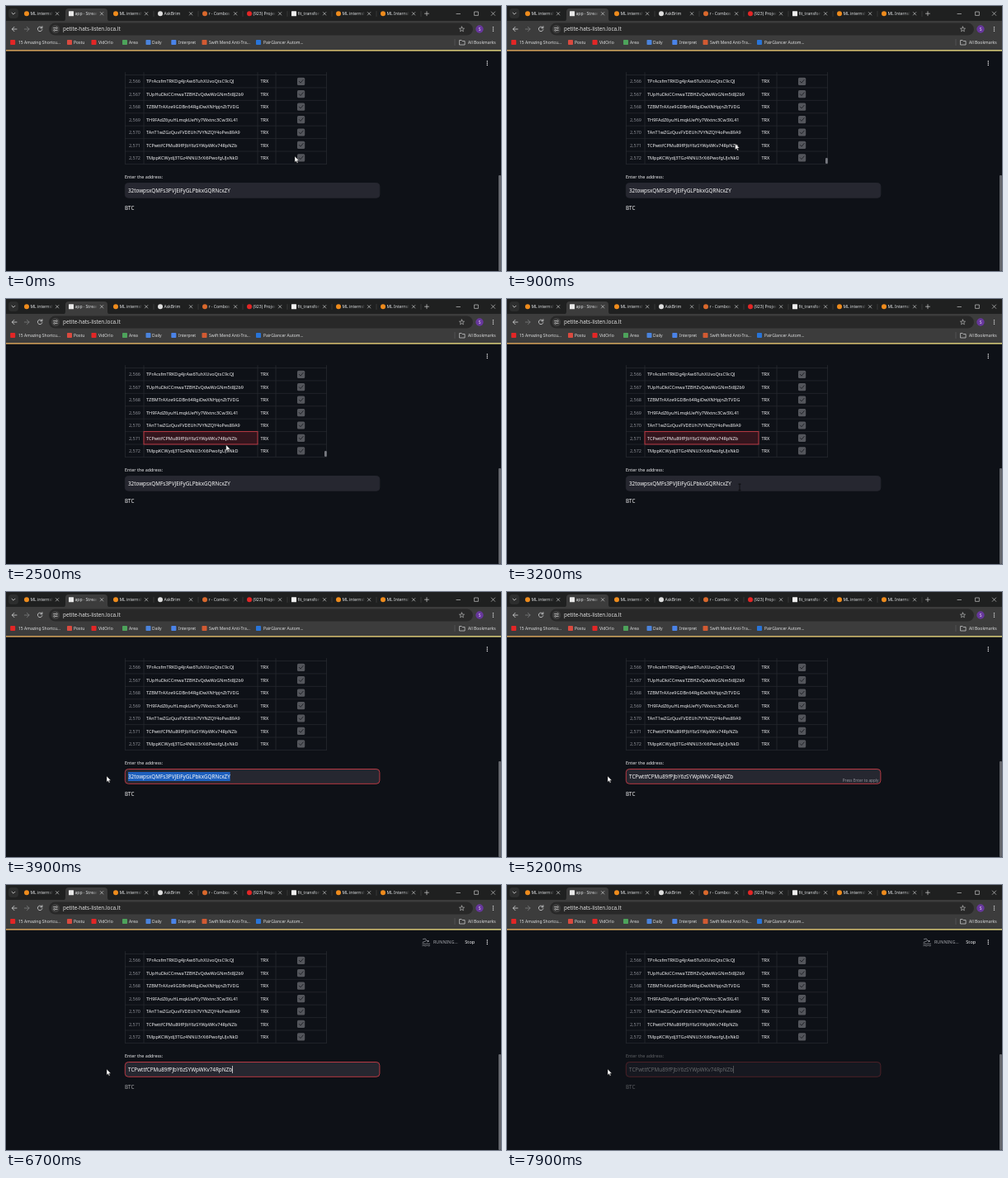
Animation, 600 px wide and 321 px high, one loop 8000 ms. Source, as an HTML page:

```html
<!DOCTYPE html>
<html lang="en">
<head>
<meta charset="utf-8">
<title>Address lookup</title>
<style>
html, body { margin: 0; width: 100%; height: 100%; overflow: hidden; background: #0e1117; }
svg { display: block; width: 600px; height: 321px; }
text { font-family: "Noto Sans", "Open Sans", sans-serif; white-space: pre; }
</style>
</head>
<body>
<svg id="stage" viewBox="0 0 600 321"></svg>
<script>
const LOOP = 8000, STEP = 100;
const NS = 'http://www.w3.org/2000/svg';
const stage = document.getElementById('stage');

function add(tag, attrs, parent = stage) {
  const el = document.createElementNS(NS, tag);
  for (const k in attrs) el.setAttribute(k, attrs[k]);
  parent.appendChild(el);
  return el;
}
const rect = (x, y, width, height, fill, more = {}, parent) =>
  add('rect', { x, y, width, height, fill, ...more }, parent);
const dot = (cx, cy, r, fill, parent) => add('circle', { cx, cy, r, fill }, parent);
const line = (d, stroke, width = 0.8, parent) =>
  add('path', { d, stroke, 'stroke-width': width, fill: 'none', 'stroke-linecap': 'round', 'stroke-linejoin': 'round' }, parent);
function label(x, y, str, size, fill, more = {}, parent) {
  const el = add('text', { x, y, 'font-size': size, fill, ...more }, parent);
  el.textContent = str;
  return el;
}
function gradient(id, stops, more = {}) {
  const el = add('linearGradient', { id, ...more }, add('defs', {}));
  for (const [offset, tone] of stops) add('stop', { offset, 'stop-color': tone }, el);
}
const group = () => add('g', {});
function kebab(x, y, fill) {
  for (const d of [-2.2, 0, 2.2]) dot(x, y + d, 0.75, fill);
}

function drawTabs() {
  rect(0, 0, 600, 19, '#1f2020');
  rect(3, 3, 12, 12, '#2d2e2e', { rx: 4 });
  line('M7 8.2L9 10.2L11 8.2', '#d8d8d8');
  add('path', { d: 'M68 19Q72 19 72 15V7Q72 3 76 3H119Q123 3 123 7V15Q123 19 127 19Z', fill: '#3c3c3c' });

  const orange = '#ee8b1c';
  const tabs = [
    ['ML internship', orange], ['app · Streamlit', '#e8e8e8'], ['ML internship', orange],
    ['AskBrim', '#dedede'], ['r - Combos', '#d9682c'], ['(923) Project', '#e32626'],
    ['fit_transform', '#f0f0f0'], ['ML internship', orange], ['ML Internship', orange]
  ];
  tabs.forEach(([name, tone], i) => {
    const x = 25 + i * 54;
    gradient('fade' + i, [[0.8, '#fff'], [1, '#000']], { gradientUnits: 'userSpaceOnUse', x1: x, x2: x + 32, y1: 0, y2: 0 });
    const mask = add('mask', { id: 'tab' + i, maskUnits: 'userSpaceOnUse', x, y: 0, width: 32, height: 19 });
    rect(x, 0, 32, 19, `url(#fade${i})`, {}, mask);
    if (i === 1 || i === 6) rect(x - 3, 6.2, 6, 6, tone, { rx: 0.5 });
    else dot(x, 9.2, 3, tone);
    label(x + 4.4, 11.2, name, 5.1, '#dfe1e3', { mask: `url(#tab${i})` });
    line(`M${x + 35.4} 7.6l3.4 3.4m0 -3.4l-3.4 3.4`, '#c9cacb', 0.7);
    if (i > 1) line(`M${x + 46} 6.5v6`, '#4a4b4b', 0.6);
  });
  line('M507.5 9.2h5M510 6.7v5', '#d0d0d0', 0.7);
  line('M546 9.5h4.5', '#e0e0e0', 0.6);
  line('M568 7h4.4v4.4h-4.4z', '#e0e0e0', 0.6);
  line('M588.3 7l4.4 4.4m0 -4.4l-4.4 4.4', '#e0e0e0', 0.6);
}

function drawToolbar() {
  rect(0, 18, 600, 36, '#3c3c3c');
  rect(52, 20.5, 514, 15, '#282828', { rx: 7.5 });
  line('M13 28H7.4M10 25.3L7.3 28L10 30.7', '#d5d6d7');
  line('M22.4 28H28M25.4 25.3L28.1 28L25.4 30.7', '#7d7e7f');
  line('M43.6 26.4A2.8 2.8 0 1 0 43.9 28.7M43.9 24.6V26.8H41.7', '#d5d6d7');
  dot(60, 28, 5.2, '#3c3c3c');
  line('M57.6 26.6h2M62.2 29.4h-2', '#e3e3e3', 0.7);
  for (const d of [-1.4, 1.4])
    add('circle', { cx: 60 - d, cy: 28 + d, r: 0.9, fill: 'none', stroke: '#e3e3e3', 'stroke-width': 0.6 });
  label(69, 30.2, 'petite-hats-listen.loca.lt', 6.35, '#e3e3e3');
  let star = '';
  for (let i = 0; i < 10; i++) {
    const a = i * Math.PI / 5, r = i % 2 ? 1.4 : 3.2;
    star += `${i ? 'L' : 'M'}${552.5 + r * Math.sin(a)} ${28.2 - r * Math.cos(a)}`;
  }
  line(star + 'Z', '#c8c9ca', 0.6);
  dot(574, 28, 4.7, '#67379c');
  label(574, 29.9, 'S', 5, '#f0e8fa', { 'text-anchor': 'middle' });
  kebab(590.5, 28, '#d5d6d7');

  const marks = [
    [8.2, '15 Amazing Shortcu...', '#e32626', 15], [77, 'Postu', '#d94a3f', 82],
    [106.5, 'VidOrlo', '#e32626', 112], [144, 'Area', '#4da35b', 149],
    [172.5, 'Daily', '#4a83dc', 177], [203.3, 'Interpret', '#4a83e8', 209],
    [240.5, 'Swift Mend Anti-Tra...', '#d25a32', 246], [306, 'PairGlancer Autom...', '#2874d8', 312]
  ];
  for (const [cx, name, tone, x] of marks) {
    rect(cx - 3, 41, 6, 6, tone, { rx: 0.8 });
    label(x, 45.9, name, 5, '#dfe0e1');
  }
  line('M544 40.5v7', '#606162', 0.6);
  line('M550 41.5h2.2l.9 1h3v4.5h-6.1z', '#d5d6d7', 0.7);
  label(560, 45.9, 'All Bookmarks', 5, '#dfe0e1');
}

const rows = [
  'TPrAcsfmTRKDg4jrAw6TuhXUvoQtsC9cQJ', 'TUpHuDkiCCmwaTZBHZvQdwWzGNm5t8J2b9',
  'TZBMTrAXze9GDBn64RgiDwXNHpjnZtTVDG', 'TH9FAdZ6yuHLmqkUefYy7Wxtnc3Cw3XL41',
  'TAnT1wZGzQuvFVDEUh7VYNZQY4oPes89A9', 'TCPwttfCPMu89fPJbY6zSYWpWKv74RpNZb',
  'TMppKCWydj3TGz4NNU3rXi6PwofgUJxNkD'
];
const OLD = '32towpsxQMFs3PVJEiFyGLPbkxGQRNcxZY', NEW = rows[5];
const rowY = i => 83.5 + i * 15.42;

function drawTable() {
  for (let i = 0; i <= rows.length; i++) line(`M144.5 ${rowY(i)}H388.5`, '#292b32', 0.7);
  for (const x of [144.5, 167, 305, 327, 388.5]) line(`M${x} 80.5V191.4`, '#292b32', 0.7);
  const cell = rect(167, rowY(5), 138, 15.4, '#33151d', { stroke: '#c93d47', 'stroke-width': 0.9 });
  rows.forEach((addr, i) => {
    const y = rowY(i) + 7.8;
    label(163, y + 2.1, '2,' + (2566 + i).toString().slice(1), 5.5, '#8b8d94', { 'text-anchor': 'end' });
    label(170, y + 2.1, addr, 5.5, '#f4f4f6', { 'font-weight': 500 });
    label(308.4, y + 2.1, 'TRX', 5.6, '#f4f4f6', { 'font-weight': 500 });
    rect(353, y - 4.6, 9.2, 9.2, '#54565c', { rx: 1.5 });
    line(`M355.3 ${y}l1.7 1.8l3.2 -3.7`, '#24262c', 1);
  });
  return cell;
}

drawTabs();
drawToolbar();
rect(0, 54, 600, 267, '#0e1117');
gradient('band', [[0, '#e2a95c'], [1, '#e9dd82']]);
rect(0, 53.2, 600, 1.4, 'url(#band)');
const cell = drawTable();
const thumb = rect(386, 184, 2.8, 7, '#777980', { rx: 1.3 });
rect(597, 205, 3, 116, '#63656b', { rx: 1 });
kebab(583.3, 69.3, '#f0f0f2');

const form = group();
label(144, 209.4, 'Enter the address:', 5.4, '#f0f0f2', {}, form);
const box = rect(144.3, 214.5, 308.6, 17.8, '#262730', { rx: 4, 'stroke-width': 0.9 }, form);
const mark = rect(148, 218, 0, 11, '#1d5fbd', {}, form);
const field = label(148, 225.9, OLD, 6.3, '#fafafa', {}, form);
const caret = rect(273, 219, 0.7, 9, '#fafafa', {}, form);
const hint = label(450.5, 230, 'Press Enter to apply', 4.7, '#92949c', { 'text-anchor': 'end' }, form);
const result = label(144, 247.4, 'BTC', 6.3, '#f0f0f2');

const running = group();
dot(511.6, 68, 1, '#a3a5ab', running);
const wave = 'q1.2 -1 2.3 0t2.3 0t2.3 0t2 0';
line(`M505.5 65.6l2.8 -.6l2 2.8M505 69.4l4 -1.6M504.8 71.2${wave}M504.8 73.4${wave}`, '#a3a5ab', 0.7, running);
label(518, 71.3, 'RUNNING...', 5.4, '#a3a5ab', {}, running);
label(556.3, 71.3, 'Stop', 5.6, '#f4f4f6', { 'font-weight': 500 }, running);

const arrow = add('path', { d: 'M0 0V7.2L1.7 5.7L2.8 8.2L4 7.7L2.9 5.3H5.1Z', fill: '#fff', stroke: '#111', 'stroke-width': 0.4 });
const beam = line('M-1.2 -3.8H1.2M0 -3.8V3.8M-1.2 3.8H1.2', '#08090b', 0.8);

// time, x, y of the pointer
const path = [
  [0, 350, 182], [300, 350, 182], [1100, 263, 164], [2300, 263, 164],
  [3000, 282, 228], [3300, 282, 228], [3700, 122, 223], [LOOP, 122, 223]
];
const clamp = v => Math.min(1, Math.max(0, v));
const ease = v => v * v * (3 - 2 * v);
const ramp = (t, a, b) => ease(clamp((t - a) / (b - a)));
const show = (el, on) => el.setAttribute('visibility', on ? 'visible' : 'hidden');

function pointer(t) {
  const i = path.findIndex(p => p[0] > t);
  const [t0, x0, y0] = path[i - 1], [t1, x1, y1] = path[i];
  const k = ramp(t, t0, t1);
  return [x0 + (x1 - x0) * k, y0 + (y1 - y0) * k];
}

function draw(t) {
  const [x, y] = pointer(t);
  const focus = t >= 3300, pasted = t >= 4650, sent = t >= 5700;
  const inBox = x > 144 && y > 214;
  for (const el of [arrow, beam]) el.setAttribute('transform', `matrix(1 0 0 1 ${x} ${y})`);
  show(arrow, !inBox);
  show(beam, inBox);
  show(cell, t >= 1300 && !focus);
  show(thumb, t >= 400 && y < 192 && t < 3000);

  field.textContent = pasted ? NEW : OLD;
  const end = 148 + field.getComputedTextLength();
  const start = Math.min(end, Math.max(148, x));
  mark.setAttribute('x', start);
  mark.setAttribute('width', end - start);
  show(mark, focus && !pasted);
  box.setAttribute('stroke', focus ? '#c93d47' : '#262730');
  caret.setAttribute('x', end + 0.2);
  show(caret, pasted && (t - 4650) % 1000 < 500);
  show(hint, pasted && !sent);
  show(running, sent);
  result.setAttribute('opacity', 1 - 0.67 * ramp(t, 6100, 7300));
  form.setAttribute('opacity', 1 - 0.64 * ramp(t, 6800, 7700));
}

function tick() {
  draw(Math.floor(performance.now() % LOOP / STEP) * STEP);
  requestAnimationFrame(tick);
}
tick();
</script>
</body>
</html>
```
